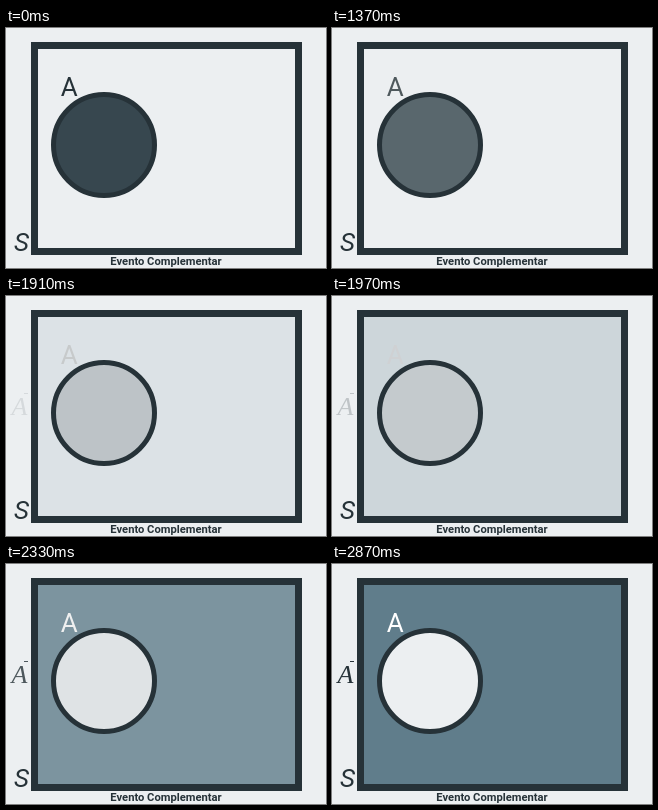
An HTML page that plays this animation: 320 by 240 pixels, repeating every 4.14 s.

```html
<!DOCTYPE html>
<html lang="pt">
<head>
<meta charset="utf-8">
<title>Evento Complementar</title>
<style>
  html, body { margin: 0; width: 100%; height: 100%; overflow: hidden; background: #eceff1; }
  svg { display: block; width: 100%; height: 100%; }
  text { font-family: Roboto, sans-serif; font-size: 26px; fill: #263238; }
  .outline { stroke: #263238; }
  #complement { font-family: "Liberation Serif", serif; font-style: italic; }
  .caption { font-size: 11.2px; font-weight: 700; text-anchor: middle; }
</style>
</head>
<body>
<svg viewBox="0 0 320 240">
  <rect id="space" class="outline" x="28.5" y="17.5" width="264" height="206" fill="#eceff1" stroke-width="7"/>
  <circle id="event" class="outline" cx="98" cy="117" r="50.5" fill="#37474f" stroke-width="5"/>
  <text id="label" x="54.7" y="68">A</text>
  <g id="complement" opacity="0">
    <text x="5.5" y="119" style="font-family:inherit">A</text>
    <path d="M18 97.5h4" stroke="#263238"/>
  </g>
  <text x="8" y="223" font-style="italic">S</text>
  <text class="caption" x="160" y="237">Evento Complementar</text>
</svg>
<script>
const LOOP = 4140, FIRST = 1130, LAST = 2870, STEP = 60;

function fade(id, property, from, to, start, duration) {
  const animation = document.getElementById(id).animate(
    { [property]: [from, to] },
    { delay: start, duration, easing: "ease", fill: "both" }
  );
  animation.pause();
  return animation;
}

const fades = [
  fade("event", "fill", "#37474f", "#eceff1", 1090, 1850),
  fade("label", "fill", "#263238", "#ffffff", 1090, 1850),
  fade("space", "fill", "#eceff1", "#607d8b", 1790, 1080),
  fade("complement", "opacity", 0, 1, 1790, 1080)
];

// The fades advance in steps, with a rest at either end.
function draw(now) {
  const time = now % LOOP;
  const stepped = time < FIRST ? 0
    : Math.min(LAST, FIRST + STEP * Math.floor((time - FIRST) / STEP));
  for (const animation of fades) animation.currentTime = stepped;
}

const origin = performance.now();
function tick() {
  draw(performance.now() - origin);
  requestAnimationFrame(tick);
}
tick();
</script>
</body>
</html>
```
